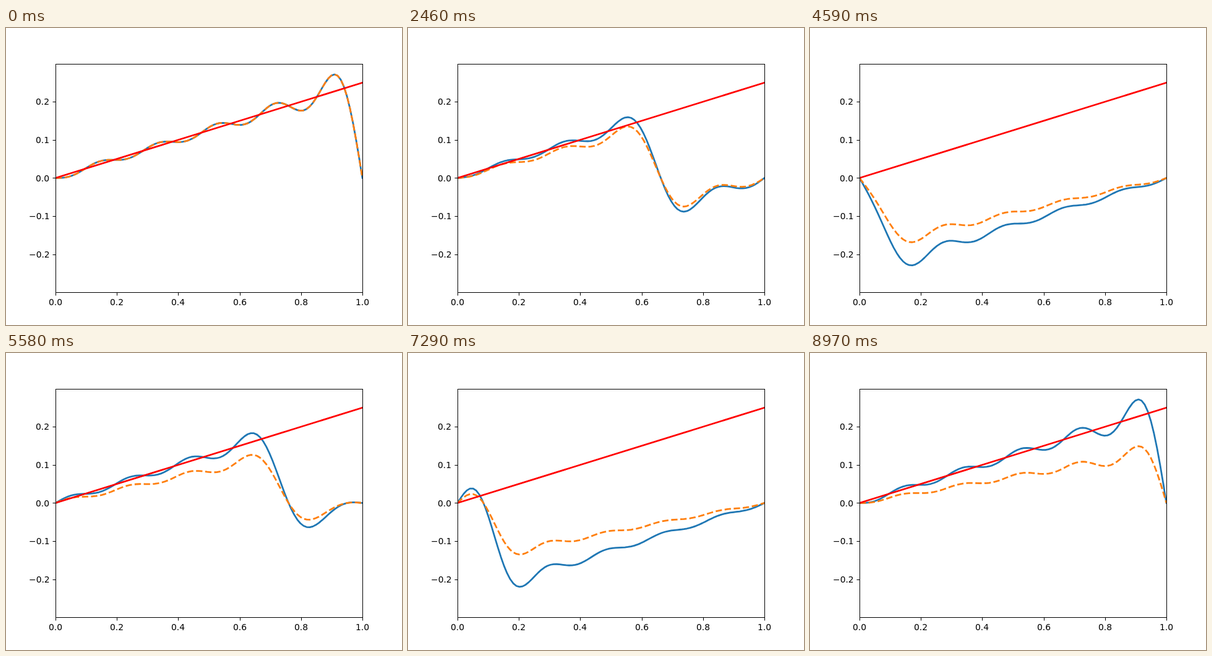
An HTML page for the animation above (9000 ms loop, 640 by 480 pixels).

```html
<!DOCTYPE html>
<html lang="en">
<head>
<meta charset="utf-8">
<title>Vibrating string</title>
<style>
  html, body { margin: 0; width: 100%; height: 100%; overflow: hidden; background: #fff; }
  svg { display: block; width: 640px; height: 480px; }
  .curve { fill: none; stroke-width: 2.778; stroke-linejoin: round; }
  .axis { fill: none; stroke: #000; stroke-width: 1; }
  text { font: 13.889px "DejaVu Sans", sans-serif; fill: #000; }
</style>
</head>
<body>
<svg viewBox="0 0 640 480">
  <clipPath id="area"><rect x="80" y="57.6" width="496" height="369.6"/></clipPath>
  <g clip-path="url(#area)">
    <path id="free" class="curve" stroke="#1f77b4" stroke-linecap="square"/>
    <path id="damped" class="curve" stroke="#ff7f0e" stroke-dasharray="10.278 4.444"/>
    <path id="start" class="curve" stroke="#f00" stroke-linecap="square"/>
  </g>
  <g id="axes"><rect class="axis" x="80.5" y="58.5" width="496" height="369"/></g>
</svg>
<script>
const STEP = 30, STEPS = 300, CYCLES = 3, DECAY = 0.6;
const MODES = 10, POINTS = 100, SLOPE = 0.25;

const byId = id => document.getElementById(id);
const px = x => 80 + 496 * x;
const py = y => 242.4 - 616 * y;
const snap = v => Math.floor(v + 0.5) + 0.5;

function add(name, attrs, content = '') {
  const node = document.createElementNS('http://www.w3.org/2000/svg', name);
  for (const key in attrs) node.setAttribute(key, attrs[key]);
  node.textContent = content;
  byId('axes').append(node);
}

function drawAxes() {
  for (let i = 0; i <= 5; i++) {
    const x = px(i / 5);
    add('path', { class: 'axis', d: `M${snap(x)} 427.5v5` });
    add('text', { x: Math.round(x - 11), y: 448 }, (i / 5).toFixed(1));
  }
  for (let i = -2; i <= 2; i++) {
    const y = py(i / 10);
    add('path', { class: 'axis', d: `M80.5 ${snap(y)}h-5` });
    add('text', { x: i < 0 ? 37 : 48, y: Math.round(y + 5.2) },
      (i < 0 ? '\u2212' : '') + Math.abs(i / 10).toFixed(1));
  }
}

// Sine series of SLOPE * x, each mode swinging at its own multiple of the base rate
function height(x, phase) {
  let sum = 0;
  for (let n = 1; n <= MODES; n++) {
    const size = 2 * SLOPE * (n % 2 ? 1 : -1) / (n * Math.PI);
    sum += size * Math.sin(n * Math.PI * x) * Math.cos(n * phase);
  }
  return sum;
}

function linePath(heights, scale) {
  return 'M' + heights.map((h, i) =>
    px(i / (POINTS - 1)).toFixed(3) + ' ' + py(h * scale).toFixed(3)).join('L');
}

let shown = -1;
function draw(now) {
  const step = Math.floor(now / STEP) % STEPS;
  if (step !== shown) {
    shown = step;
    const part = step / (STEPS - 1);
    const phase = 2 * Math.PI * CYCLES * part;
    const heights = Array.from({ length: POINTS }, (_, i) => height(i / (POINTS - 1), phase));
    byId('free').setAttribute('d', linePath(heights, 1));
    byId('damped').setAttribute('d', linePath(heights, Math.exp(-DECAY * part)));
  }
}

function tick() {
  draw(performance.now() - began);
  requestAnimationFrame(tick);
}

drawAxes();
byId('start').setAttribute('d', `M${px(0)} ${py(0)}L${px(1)} ${py(SLOPE)}`);
const began = performance.now();
tick();
</script>
</body>
</html>
```
